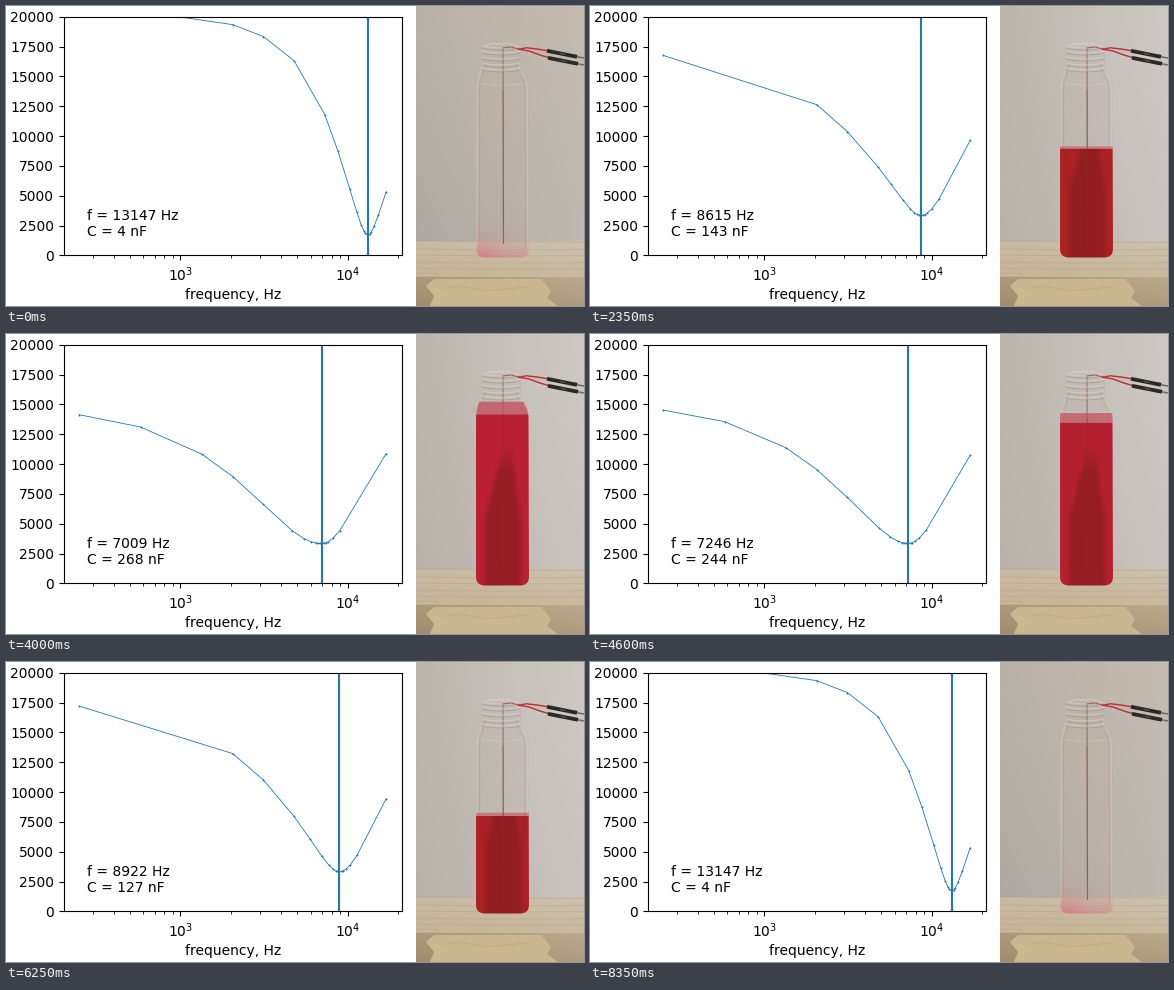
Animation, 578 px wide and 300 px high, one loop 8.4 s. Source, as a matplotlib script:

```python
import numpy as np
import matplotlib.pyplot as plt
from matplotlib.animation import FuncAnimation
from matplotlib.patches import PathPatch, Polygon
from matplotlib.path import Path

W, H, DPI = 578, 300, 100
FRAMES, STEP = 168, 50
BLUE = "#1f77b4"
X0, X1, Y0, Y1 = 57.85, 395.83, 249.4, 10.84
F_MIN, F_MAX, Z_MAX = 200.8, 21050, 20000

# Model parameters at a few moments while the bottle fills
KEYS = [0, 22, 47, 62, 80]
RESONANCE = [13147, 10589, 8615, 7998, 7009]
FLOOR = [1700, 3210, 3350, 3370, 3350]
PLATEAU = [21500, 19300, 17000, 15800, 14550]
TILT = [1000, -4300, -2700, -4000, -8400]
BUMP = [68000, 23000, -11000, -14000, -8000]
RISE = [19800, 15500, 13340, 12700, 11720]

GRID = 248 * np.exp(0.4225 * np.arange(11))
NEAR = 0.41 * 0.6 ** np.arange(6)


def at(values, k):
    return np.interp(k, KEYS, values)


def resonance(k):
    """1/f^2 grows linearly between the keys and past the last one."""
    tone = np.array(RESONANCE, float) ** -2
    extra = max(k - KEYS[-1], 0) * (tone[-1] - tone[-2]) / (KEYS[-1] - KEYS[-2])
    return (at(tone, k) + extra) ** -0.5


def samples(f0):
    """Coarse grid first, then a search that closes in on the minimum."""
    coarse = GRID[[0, 5, 6, 7, 8]] if f0 > 7500 else GRID[[0, 2, 4, 5, 6, 7]]
    left = np.concatenate([coarse[coarse < f0 * np.exp(-0.45)], f0 * np.exp(-NEAR)])
    right = f0 * np.exp(NEAR[:0:-1])
    right = right[right < GRID[-1] * 0.97]
    return np.concatenate([left, [f0], right, GRID[-1:]])


def impedance(f, k, f0):
    r = f / f0
    below = (1 - r) * (at(PLATEAU, k) + at(TILT, k) * r
                       + at(BUMP, k) * (r * (1 - r)) ** 2)
    above = at(RISE, k) * np.log(r)
    return np.hypot(at(FLOOR, k), np.where(r < 1, below, above))


# Plot
plt.rcParams["font.family"] = "DejaVu Sans"
fig = plt.figure(figsize=(W / DPI, H / DPI), dpi=DPI, facecolor="white")
ax = fig.add_axes([X0 / W, 1 - Y0 / H, (X1 - X0) / W, (Y0 - Y1) / H])
ax.set_xscale("log")
ax.set_xlim(F_MIN, F_MAX)
ax.set_ylim(0, Z_MAX)
ax.set_yticks(np.arange(0, Z_MAX + 1, 2500))
ax.set_xlabel("frequency, Hz", labelpad=3.2)
curve, = ax.plot([], [], color=BLUE, lw=0.6, marker=".", ms=2, mew=0.3)
marker = ax.axvline(1e4, color=BLUE, lw=1.5)
label = fig.text(81 / W, 1 - 230 / H, "", fontsize=10, va="baseline")

# Photo
photo = fig.add_axes([410 / W, 0, 168 / W, 1])
photo.set_axis_off()


def rgb(r, g, b):
    return np.array([r, g, b]) / 255


def line(points, color, lw, z, alpha=1):
    x, y = zip(*points)
    photo.plot(x, y, color=color, lw=lw * 72 / DPI, alpha=alpha, zorder=z,
               solid_capstyle="butt", solid_joinstyle="round")


def shade(tl, tr, bl, br, power=1):
    """Four-corner colour gradient."""
    u = np.linspace(0, 1, 42)[None, :, None]
    v = np.linspace(0, 1, 60)[:, None, None] ** power
    tl, tr, bl, br = (rgb(*c) for c in (tl, tr, bl, br))
    return (tl * (1 - u) + tr * u) * (1 - v) + (bl * (1 - u) + br * u) * v


def picture(data, x0, x1, top, bottom, z):
    return photo.imshow(data, extent=(x0, x1, bottom, top), aspect="auto",
                        interpolation="bilinear", zorder=z)


wall_dim = shade((184, 177, 167), (196, 188, 177), (174, 169, 162), (190, 185, 177), 1.5)
wall_lit = shade((188, 182, 174), (206, 201, 195), (184, 178, 170), (200, 195, 188), 1.5)
wall = picture(wall_dim, 410, 578, 0, 237, 0)
picture(shade((200, 186, 163), (206, 194, 174), (197, 179, 150), (200, 184, 158)),
        410, 578, 235, 271, 1)
picture(shade((174, 153, 124), (188, 168, 139), (160, 139, 108), (176, 156, 126)),
        410, 578, 270, 300, 1)
photo.set_xlim(410, 578)
photo.set_ylim(300, 0)

line([(410, 235), (578, 236.5)], rgb(182, 167, 148), 1, 2, .6)
for y in (243, 249, 256, 262):
    line([(410, y), (490, y + 1), (578, y + .5)], rgb(174, 154, 124), 1, 2, .3)
line([(410, 270), (578, 270.5)], rgb(216, 200, 170), 1.2, 2, .6)
photo.add_patch(Polygon([(424, 300), (428, 290), (420, 280), (428, 273), (535, 273),
                         (545, 285), (541, 292), (552, 300)],
                        fc=rgb(203, 183, 143), ec="none", zorder=2))
line([(436, 284), (452, 280), (480, 285), (520, 281)], rgb(180, 158, 118), 1, 3, .5)

outline = [(476, 40), (476, 58), (474, 65), (471, 75), (470, 82), (470, 243),
           (470, 251), (478, 251.5), (515, 251.5), (523, 251), (523, 243),
           (522.5, 82), (521, 75), (516, 65), (514, 58), (514, 40)]
bottle = Path(outline, [Path.MOVETO] + [Path.LINETO] * 5 + [Path.CURVE3] * 2
              + [Path.LINETO] + [Path.CURVE3] * 2 + [Path.LINETO] * 5)
glass = photo.add_patch(PathPatch(bottle, fc=rgb(186, 174, 163), ec="none", zorder=3))
for side, inset in ((outline[1:6], 1.2), (outline[10:15], -1.2)):
    line([(x + inset, y) for x, y in side], rgb(208, 202, 195), 1.3, 4, .6)
    line([(x + 3 * inset, y) for x, y in side], rgb(164, 153, 144), 1, 4, .4)
line([(474, 78), (497, 79.5), (519, 78)], rgb(212, 207, 200), 1.2, 4, .4)
line([(497, 41), (497.5, 238)], rgb(128, 108, 88), 1.2, 5, .8)

# Liquid and the pink film left in the empty bottle, clipped to the glass
TOP, BOTTOM = 60, 252
gx, gy = np.meshgrid(np.arange(470, 524) + .5, np.arange(TOP, BOTTOM) + .5)
liquid = picture(np.zeros(gx.shape + (4,)), 470, 524, TOP, BOTTOM, 6)
stain = np.empty(gx.shape + (4,))
stain[..., :3] = rgb(218, 118, 130)
stain[..., 3] = np.exp((gy - 252) / 12) * (.45 + .5 * np.exp(-((gx - 476) / 18) ** 2))
residue = picture(stain, 470, 524, TOP, BOTTOM, 8)
for image in (liquid, residue):
    image.set_clip_path(bottle, photo.transData)
line([(497, 84), (497.5, 238)], rgb(120, 60, 56), 1, 7, .35)

# Neck with its thread
for y in (40, 45, 51, 57, 62):
    u = np.linspace(475.5, 514.5, 20)
    bow = 2 * (1 - ((u - 495) / 19.5) ** 2)
    line(list(zip(u, y + bow)), rgb(216, 210, 203), 1.3, 9, .6)
    line(list(zip(u, y + 2 + bow)), rgb(150, 142, 133), .9, 9, .5)
for x in (476, 514):
    line([(x, 40), (x, 63)], rgb(190, 183, 175), 1.3, 9, .7)
line([(479, 39.5), (486, 37.8), (504, 37.8), (511, 39.5)], rgb(216, 210, 203), 1.2, 9, .7)

# Leads
RED = rgb(190, 46, 54)
line([(497, 42), (505, 41), (513, 43)], rgb(150, 90, 80), 1, 10)
line([(512, 43.5), (520, 41.8), (531, 43), (543, 45)], RED, 1.4, 10)
line([(512, 43), (523, 45), (534, 49), (544, 52)], RED, 1.4, 10)
for x, y in ((541, 44.8), (542, 51.8)):
    line([(x, y), (x + 30, y + 6)], rgb(42, 41, 39), 3.8, 11)
    line([(x + 30, y + 6), (578, y + 7.2)], rgb(112, 108, 106), 1.6, 11)
    line([(x + 13, y + 2.6), (x + 18, y + 3.6)], rgb(86, 88, 82), 1.2, 12)


def mix(a, b, t):
    return a + (b - a) * np.asarray(t)[..., None]


def ramp(x):
    return np.clip(x, 0, 1)


def liquid_rgba(k):
    level = 249.3 - 2.27 * k
    # the surface is seen from above below eye height, from underneath above it
    eye = 118
    far = level + (eye - level) * (.09 if level > eye else .25)
    top, front = min(level, far), max(level, far)

    crimson = ramp((k - 45) / 35) ** 2
    color = mix(rgb(170, 29, 33), rgb(186, 27, 48), crimson)
    drop = ramp((gy - 115) / 70)
    core = ramp((7 + 14 * drop - abs(gx - 501 + 4 * drop)) / 6) * ramp((gy - 112) / 25)
    color = mix(color, rgb(139, 24, 27), core * .75)
    color = mix(color, rgb(190, 42, 54), ramp((abs(gx - 496.7) - 24) / 3) * .35)
    body = ramp(gy - front + .5)
    film = ramp(gy - top + .5) * (.6 + .2 * crimson)
    color = mix(rgb(196, 78, 92), color, body)
    alpha = np.maximum(body, film) * .97 * ramp(k / 4)
    return np.dstack([color, alpha])


def draw(n):
    k = min(n, FRAMES - 1 - n)
    f0 = resonance(k)
    freq = samples(f0)
    curve.set_data(freq, impedance(freq, k, f0))
    marker.set_xdata([f0, f0])
    cap = 1.8125e10 / f0 ** 2 - 100.9
    label.set_text(f"f = {f0:.0f} Hz\nC = {cap:.0f} nF")

    light = ramp(k / 12)
    wall.set_data(wall_dim + (wall_lit - wall_dim) * light)
    glass.set_alpha(.3 - .1 * light)
    liquid.set_data(liquid_rgba(k))
    residue.set_alpha(float(ramp(1 - k / 5)))
    return curve, marker, label, wall, glass, liquid, residue


anim = FuncAnimation(fig, draw, frames=FRAMES, interval=STEP,
                     init_func=lambda: draw(0), repeat=True, repeat_delay=0)
plt.show()
```
